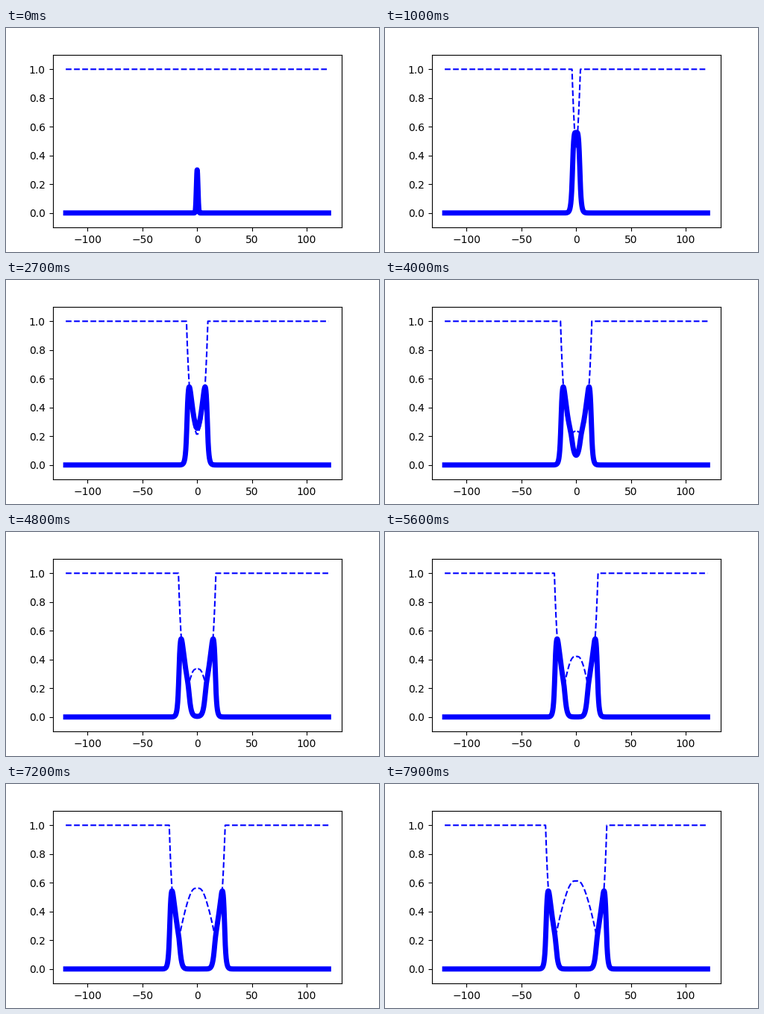
Animation, 500 px wide and 300 px high, one loop 8000 ms. Source, as a matplotlib script:

```python
import numpy as np
import matplotlib.pyplot as plt
from matplotlib.animation import FuncAnimation

# Travelling pulses in a neural field with synaptic depression:
#   u_t = -u + w * (q H(u - THETA)),   q_t = (1 - q) / ALPHA - BETA q H(u - THETA)
ALPHA, BETA, THETA = 20, 0.25, 0.2
FRAMES, INTERVAL = 80, 100
DT, SUBSTEPS = 0.025, 14

x = np.linspace(-120, 120, 2401)
dx = x[1] - x[0]
reach = np.arange(-120, 121) * dx
kernel = 0.5 * np.exp(-np.abs(reach)) * dx


def simulate():
    u = 0.3 * np.exp(-x**2)
    q = np.ones_like(x)
    states = [(u, q)]
    for _ in range(FRAMES - 1):
        for _ in range(SUBSTEPS):
            active = q * (u > THETA)
            drive = np.convolve(active, kernel, mode="same")
            u = u + DT * (drive - u)
            q = q + DT * ((1 - q) / ALPHA - BETA * active)
        states.append((u, q))
    return states


states = simulate()

fig, ax = plt.subplots(figsize=(5, 3), dpi=100)
activity, = ax.plot(x, states[0][0], "b-", lw=5)
resource, = ax.plot(x, states[0][1], "b--", lw=1.5)
ax.set_xlim(-132, 132)
ax.set_ylim(-0.1, 1.1)


def update(i):
    u, q = states[i]
    activity.set_ydata(u)
    resource.set_ydata(q)
    return activity, resource


anim = FuncAnimation(fig, update, frames=FRAMES, interval=INTERVAL,
                     repeat=True, repeat_delay=0)
plt.show()
```
